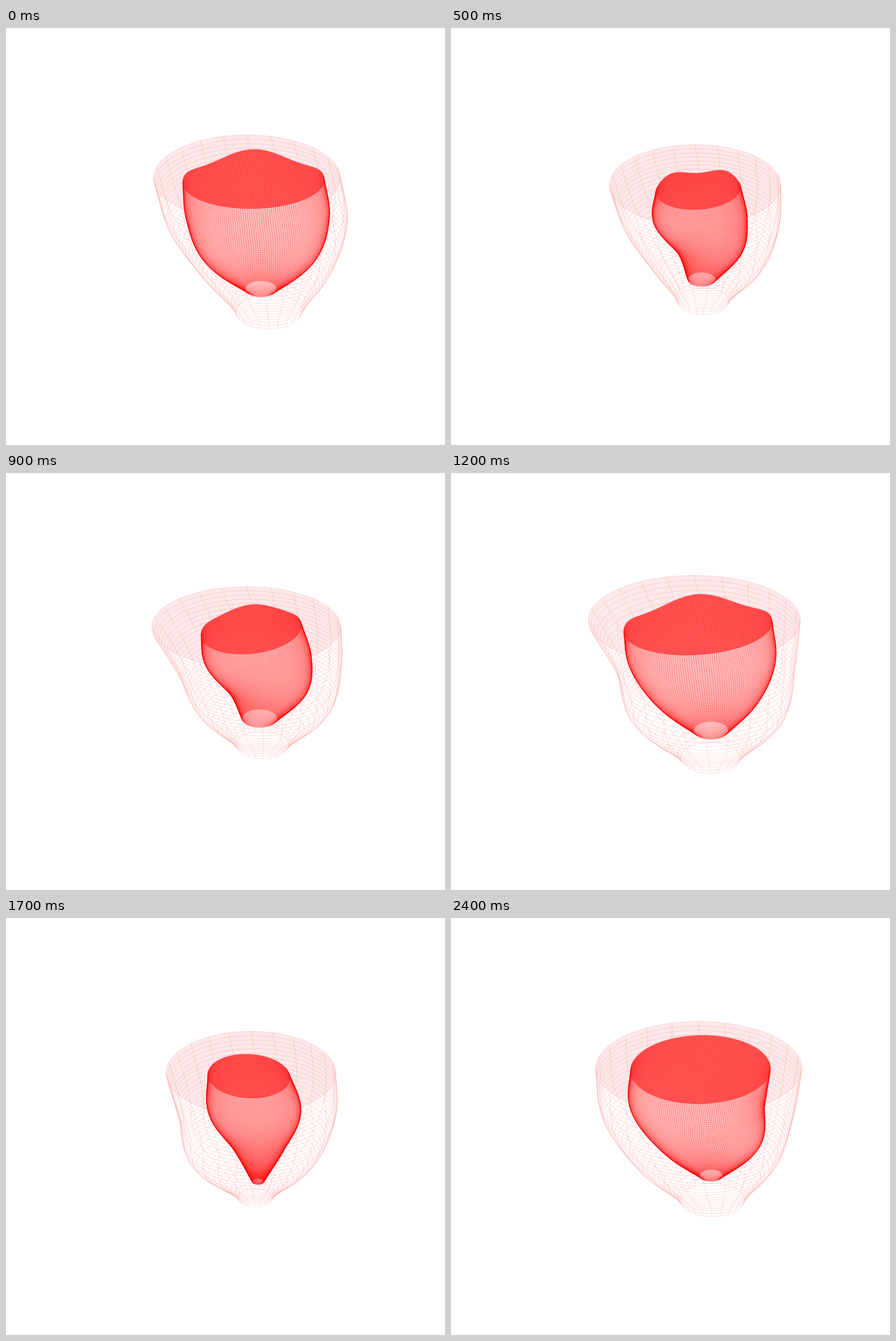
An HTML page with a canvas for the animation above (2500 ms loop, 768 by 729 pixels).

```html
<!DOCTYPE html>
<html lang="en">
<head>
<meta charset="utf-8">
<title>Beating chamber</title>
<style>
html, body { margin: 0; width: 100%; height: 100%; overflow: hidden; background: #fff; }
canvas { display: block; }
</style>
</head>
<body>
<canvas id="stage" width="768" height="729"></canvas>
<script>
const ctx = document.getElementById('stage').getContext('2d');
const LOOP = 2500, STEP = 100, TILT = 0.52;

// Key poses. rim: left, right, top, bottom, lean, wave; mid and low: left, right; foot: x, y, radius.
const poses = [
  { time: 0,
    outer: { rim: [258, 585, 187, 338], mid: [283, 597], low: [338, 570], foot: [460, 496, 58] },
    inner: { rim: [309, 557, 220, 316, -2, -8], mid: [315, 566], low: [342, 545], foot: [446, 456, 27] } },
  { time: 300,
    outer: { rim: [289, 585, 196, 350], mid: [300, 572], low: [353, 538], foot: [437, 495, 47] },
    inner: { rim: [349, 527, 254, 320, 0, 11], mid: [336, 525], low: [376, 502], foot: [441, 464, 17] } },
  { time: 700,
    outer: { rim: [265, 569, 212, 342], mid: [305, 577], low: [345, 558], foot: [445, 460, 42] },
    inner: { rim: [367, 487, 242, 315, -8, 0], mid: [372, 512], low: [415, 519], foot: [436, 415, 31] } },
  { time: 1200,
    outer: { rim: [240, 611, 179, 337], mid: [288, 602], low: [312, 585], foot: [454, 498, 52] },
    inner: { rim: [302, 562, 220, 318, -8, -8], mid: [311, 568], low: [352, 541], foot: [455, 450, 30] } },
  { time: 1700,
    outer: { rim: [280, 577, 198, 345], mid: [302, 577], low: [320, 543], foot: [436, 489, 30] },
    inner: { rim: [353, 497, 238, 315, 3, 0], mid: [354, 516], low: [397, 488], foot: [441, 461, 10] } },
  { time: 2100,
    outer: { rim: [265, 588, 197, 348], mid: [278, 580], low: [344, 554], foot: [453, 495, 60] },
    inner: { rim: [341, 500, 236, 329, -4, 0], mid: [338, 538], low: [391, 528], foot: [444, 460, 16] } },
  { time: 2400,
    outer: { rim: [253, 614, 181, 345], mid: [264, 600], low: [318, 574], foot: [457, 493, 56] },
    inner: { rim: [314, 559, 205, 325, -2, 0], mid: [313, 549], low: [360, 543], foot: [455, 450, 20] } }
];

const mix = (a, b, f) => a + (b - a) * f;

function poseAt(part, t) {
  const i = poses.findLastIndex(p => p.time <= t);
  const from = poses[i], to = poses[(i + 1) % poses.length];
  const f = (t - from.time) / ((to.time || LOOP) - from.time);
  const pose = {};
  for (const key in from[part]) {
    pose[key] = from[part][key].map((a, n) => mix(a, to[part][key][n], f));
  }
  return pose;
}

// Smooth curve through four values; taper 0 ends it upright, 1 ends it straight.
function profile(p, v, taper) {
  const i = Math.min(2, Math.floor(v * 3)), f = v * 3 - i;
  const b = p[i], c = p[i + 1];
  const a = i ? p[i - 1] : 2 * b - c;
  const d = i < 2 ? p[i + 2] : c + taper * (c - b);
  return b + f / 2 * (c - a + f * (2 * a - 5 * b + 4 * c - d + f * (3 * (b - c) + d - a)));
}

// Grid of screen points: rows are rings from rim to foot, columns are meridians.
function build({ rim, mid, low, foot }, rings, cols, taper) {
  const [left, right, top, bottom, lean = 0, wave = 0] = rim;
  const [x, y, radius] = foot;
  const lefts = [left, mid[0], low[0], x - radius];
  const rights = [right, mid[1], low[1], x + radius];
  const rimTilt = (bottom - top) / (right - left);
  return Array.from({ length: rings + 1 }, (_, j) => {
    const v = j / rings, fade = (1 - v) ** 3;
    const l = profile(lefts, v, taper), r = profile(rights, v, taper);
    const rx = (r - l) / 2, ry = rx * mix(rimTilt, TILT, v);
    const cy = mix((top + bottom) / 2, y, v);
    return Array.from({ length: cols }, (_, i) => {
      const a = i / cols * 2 * Math.PI, c = Math.cos(a), s = Math.sin(a);
      const ripple = wave * Math.cos(4 * a) * Math.max(0, -s);
      return [(l + r) / 2 + rx * c, cy + ry * s + fade * (lean * c + ripple)];
    });
  });
}

function trace(points, close) {
  points.forEach((p, i) => i ? ctx.lineTo(...p) : ctx.moveTo(...p));
  if (close) ctx.closePath();
}

function fill(rows, color) {
  ctx.beginPath();
  rows.forEach(row => trace(row, true));
  ctx.fillStyle = color;
  ctx.fill();
}

function line(points, alpha, close) {
  ctx.strokeStyle = `rgba(255,0,0,${alpha})`;
  ctx.beginPath();
  trace(points, close);
  ctx.stroke();
}

function mesh(grid, every, ringAlpha, meridianAlpha) {
  grid.forEach(row => line(row, ringAlpha, true));
  for (let i = 0; i < grid[0].length; i += every) {
    line(grid.map(row => row[i]), meridianAlpha);
  }
}

function draw(t) {
  ctx.clearRect(0, 0, 768, 729);
  ctx.lineWidth = 0.9;

  const shell = poseAt('outer', t);
  // The foot stretches downwards as the contraction starts.
  if (t > 1200 && t < 1600) shell.foot[1] += 20 * Math.sin((t - 1200) / 400 * Math.PI);
  const wall = build(shell, 30, 96, 0);
  fill([wall[0]], '#fce9ea');
  mesh(wall, 4, 0.15, 0.15);

  const cup = build(poseAt('inner', t), 80, 200, 1);
  fill(cup, '#fff0f0');
  fill([cup[0]], '#ff5e5e');
  mesh(cup, 1, 0.23, 0.33);
}

let shown = -1;
function tick(now) {
  const t = Math.floor(now % LOOP / STEP) * STEP;
  if (t !== shown) draw(shown = t);
  requestAnimationFrame(tick);
}
draw(0);
requestAnimationFrame(tick);
</script>
</body>
</html>
```
